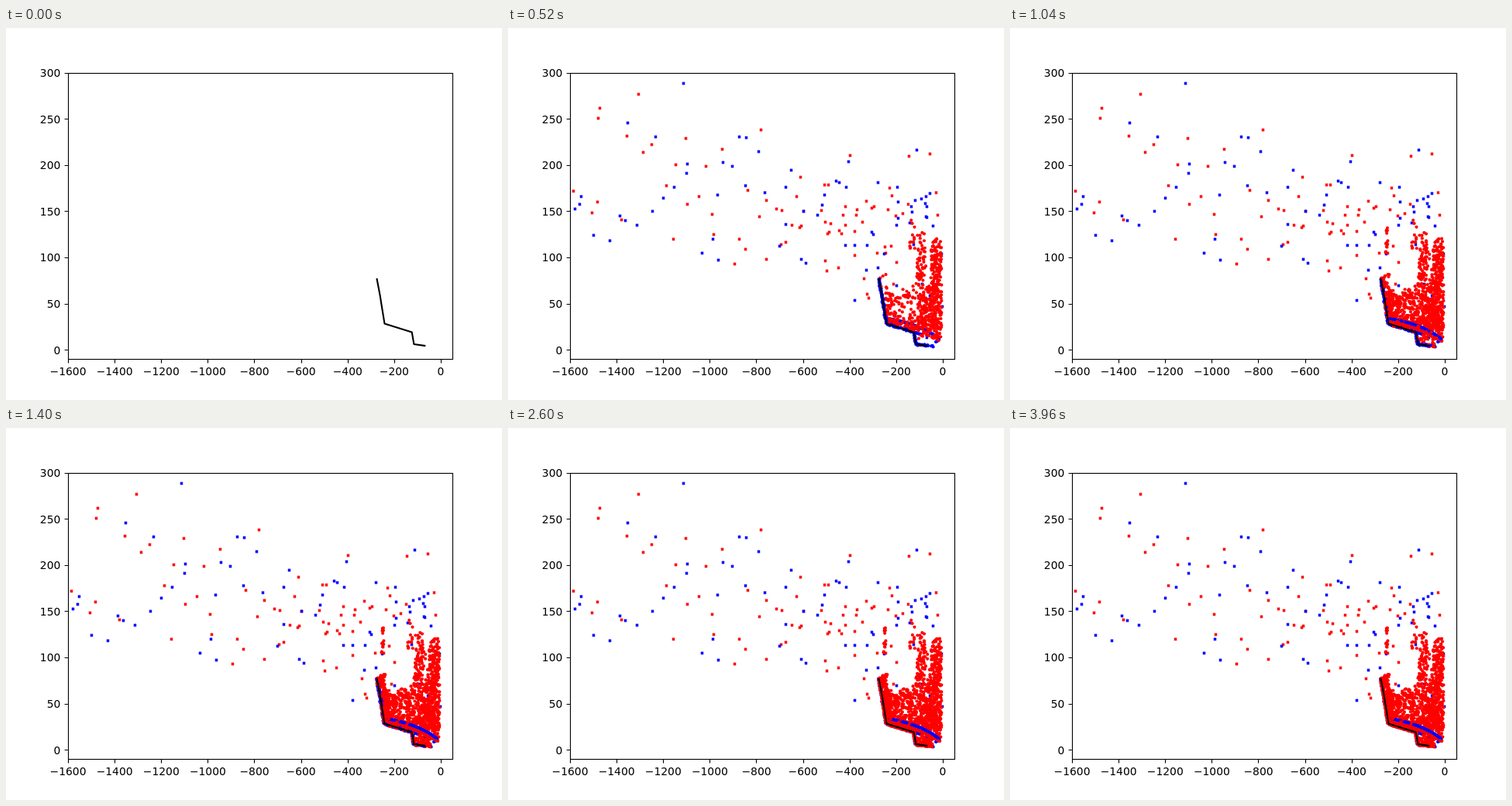
An HTML page with a canvas that plays this animation: 640x480 px, repeating every 4000 ms.

```html
<!DOCTYPE html>
<html lang="en">
<head>
<meta charset="utf-8">
<title>Scatter growth</title>
<style>
html, body { margin: 0; width: 100%; height: 100%; overflow: hidden; background: #fff; }
canvas { display: block; width: 640px; height: 480px; }
</style>
</head>
<body>
<canvas id="stage" width="640" height="480"></canvas>
<script>
const ctx = document.getElementById('stage').getContext('2d');
const LOOP = 4000, STEP = 40;
const RED = '#f00', BLUE = '#00f';

// Cross markers, as x, y pairs in pixels
const redFar = [
  84,210, 118,103, 116,116, 108,238, 115,224, 153,139, 168,85, 146,247,
  174,160, 185,150, 204,203, 216,176, 213,272, 229,142, 231,227, 246,217,
  255,178, 276,156, 263,240, 265,266, 292,304, 298,272, 306,285, 309,209,
  324,243, 326,131, 333,222, 333,298, 346,233, 353,235, 352,279, 358,276,
  366,254, 372,217, 377,192, 378,255, 376,257, 381,236
];
const redNear = [
  408,202, 413,202, 404,235, 409,250, 412,265, 414,263, 416,252, 409,300,
  411,313, 426,309, 427,261, 430,265, 432,241, 435,230, 435,254, 441,164,
  447,262, 447,293, 450,234, 449,241, 457,250, 459,323, 462,223, 463,343,
  465,348, 469,232, 472,230, 476,290, 480,322, 486,282, 487,290, 490,234,
  492,206, 495,216, 494,281, 497,330, 500,242, 501,302, 509,239, 517,165,
  516,227, 544,162, 552,212, 554,241
];
const blueFar = [
  226,71, 154,122, 190,140, 94,217, 92,227, 86,233, 110,267, 131,274,
  144,242, 151,248, 166,254, 186,236, 200,219, 214,205, 231,175, 230,187,
  270,215, 277,173, 289,178, 298,140, 307,141, 323,159, 306,203, 331,212,
  358,205, 365,183, 264,272, 250,290, 271,299, 350,281, 358,253, 381,236,
  378,298, 384,303, 399,241
];
const blueNear = [
  405,228, 408,215, 423,197, 427,199, 436,205, 439,172, 435,280, 447,280,
  447,351, 462,312, 463,280, 469,263, 471,266, 477,199, 477,309, 502,205,
  503,224, 503,245, 501,254, 485,291, 527,157, 525,222, 533,220, 520,230,
  521,237, 518,251, 538,226, 539,243, 540,244, 544,213, 539,217, 540,230,
  548,255, 523,279, 501,332, 533,380, 540,399, 560,359, 559,291, 556,319,
  544,345, 534,330
];
const track = [[478.6, 324], [482.8, 346], [484, 354], [488.5, 381.5], [523.7, 392.4], [526.4, 408], [540.3, 410]];
const longTrack = [...track, [547.5, 410.6]];
const skyline = [[486, 318], [491, 335], [500, 345], [511, 335], [520, 340], [527, 318],
  [533, 265], [540, 280], [545, 300], [551, 265], [560, 275]];

let seed = 20417;
function rnd() {
  seed = (seed * 1664525 + 1013904223) % 4294967296;
  return seed / 4294967296;
}
const between = (a, b) => a + (b - a) * rnd();

function lerpY(points, x) {
  for (let i = 1; i < points.length; i++) {
    const [x0, y0] = points[i - 1], [x1, y1] = points[i];
    if (x <= x1) return y0 + (y1 - y0) * (x - x0) / (x1 - x0);
  }
  return points[points.length - 1][1];
}

function along(points, u) {
  const lengths = points.slice(1).map((p, i) => Math.hypot(p[0] - points[i][0], p[1] - points[i][1]));
  let d = u * lengths.reduce((a, b) => a + b);
  let i = 0;
  while (i < lengths.length - 1 && d > lengths[i]) d -= lengths[i++];
  const f = d / lengths[i], a = points[i], b = points[i + 1];
  return [a[0] + (b[0] - a[0]) * f, a[1] + (b[1] - a[1]) * f];
}

// Bent blue path above the track
function arc(u) {
  const v = 1 - u;
  return [v * v * 491 + 2 * u * v * 534 + u * u * 556, v * v * 375 + 2 * u * v * 383 + u * u * 401];
}

const dots = [];
function add(count, from, to, color, place) {
  for (let i = 0; i < count; i++) {
    const [x, y] = place(i / Math.max(1, count - 1));
    dots.push({ x, y, color, born: Math.floor(between(from, to + 1)) });
  }
}
const box = (x0, x1, y0, y1, power = 1) => () =>
  [between(x0, x1), y1 - (y1 - y0) * Math.pow(rnd(), power)];
function jitter([x, y], r) {
  return [x + between(-r, r), y + between(-r, r)];
}
function mass() {
  const x = between(487, 558.5);
  const base = x < 524 ? lerpY(track, x) - 2 : Math.min(404, 388 + (x - 524) * 0.5);
  return [x, base - (base - lerpY(skyline, x)) * Math.pow(rnd(), 1.8)];
}
function leftBand() {
  const y = between(318, 381);
  const edge = 478.5 + Math.max(0, y - 324) * 0.175;
  return [edge + 1 + (y < 324 ? 3 : 0) + rnd() * 8, y];
}

// First burst
add(210, 1, 6, RED, box(546, 559.5, 272, 388, 1.15));
add(45, 1, 6, RED, box(528, 538, 264, 330));
add(65, 1, 6, RED, box(529, 541, 330, 385));
add(45, 1, 6, RED, box(538, 553, 332, 385));
add(14, 1, 6, RED, box(517.5, 525, 246, 288));
add(3, 1, 6, RED, box(510, 521, 345, 348));
add(90, 1, 5, BLUE, arc);
add(12, 1, 6, BLUE, u => [556 - 4 * u * u, 401 + 4 * u]);
add(110, 1, 6, BLUE, u => jitter(along(track, u), 0.7));
add(14, 1, 6, BLUE, u => [524 + 10 * u, 392.4 + 3.4 * u]);
// Filling up
add(640, 7, 20, RED, mass);
add(130, 21, 32, RED, mass);
add(55, 10, 20, RED, leftBand);
add(110, 21, 34, RED, leftBand);
add(5, 14, 20, RED, box(484.5, 487.5, 267, 291));
add(11, 21, 28, RED, box(484, 487, 256, 290));
add(22, 8, 20, RED, box(527, 548, 396, 409));
add(45, 21, 38, RED, box(527, 548, 400, 410));
add(70, 16, 20, BLUE, arc);
add(45, 24, 33, BLUE, arc);
add(160, 7, 20, BLUE, u => jitter(along(longTrack, u), 1.2));
add(60, 21, 36, BLUE, u => jitter(along(track, u), 1));
// The track turns red
add(170, 22, 50, RED, u => jitter(along(longTrack, u), 1.2));
add(230, 40, 78, RED, u => jitter(along(track, u), 1.1));
add(35, 79, 99, RED, u => jitter(along(track, u * 0.7), 1));
dots.sort((a, b) => a.born - b.born);

function crosses(list, color) {
  const r = 1.39;
  ctx.strokeStyle = color;
  ctx.lineWidth = 2.08;
  ctx.lineCap = 'butt';
  ctx.beginPath();
  for (let i = 0; i < list.length; i += 2) {
    const x = list[i] + 0.5, y = list[i + 1] + 0.5;
    ctx.moveTo(x - r, y - r);
    ctx.lineTo(x + r, y + r);
    ctx.moveTo(x - r, y + r);
    ctx.lineTo(x + r, y - r);
  }
  ctx.stroke();
}

function drawTrack() {
  ctx.strokeStyle = '#000';
  ctx.lineWidth = 2.08;
  ctx.lineCap = 'square';
  ctx.lineJoin = 'round';
  ctx.beginPath();
  track.forEach(([x, y]) => ctx.lineTo(x, y));
  ctx.stroke();
}

function drawAxes() {
  const snap = v => Math.floor(v + 0.5) + 0.5;
  const label = v => (v < 0 ? '\u2212' : '') + Math.abs(v);
  ctx.strokeStyle = ctx.fillStyle = '#000';
  ctx.lineWidth = 1.11;
  ctx.lineCap = 'butt';
  ctx.lineJoin = 'miter';
  ctx.font = '13.89px "DejaVu Sans", sans-serif';
  ctx.textBaseline = 'alphabetic';
  ctx.strokeRect(80.5, 58.5, 496, 369);
  ctx.beginPath();
  ctx.textAlign = 'center';
  for (let v = -1600; v <= 0; v += 200) {
    const x = 80 + (v + 1600) * 496 / 1650;
    ctx.moveTo(snap(x), 427.5);
    ctx.lineTo(snap(x), 432.4);
    ctx.fillText(label(v), x, 448);
  }
  ctx.textAlign = 'right';
  for (let v = 0; v <= 300; v += 50) {
    const y = 427.2 - (v + 10) * 369.6 / 310;
    ctx.moveTo(75.6, snap(y));
    ctx.lineTo(80.5, snap(y));
    ctx.fillText(label(v), 70.3, Math.round(y + 5.3));
  }
  ctx.stroke();
}

function draw(step) {
  ctx.fillStyle = '#fff';
  ctx.fillRect(0, 0, 640, 480);
  if (step > 0) {
    crosses(redFar, RED);
    crosses(redNear, RED);
    crosses(blueFar, BLUE);
    crosses(blueNear, BLUE);
    for (const d of dots) {
      if (d.born > step) break;
      ctx.fillStyle = d.color;
      ctx.beginPath();
      ctx.arc(d.x, d.y, 2.08, 0, 2 * Math.PI);
      ctx.fill();
    }
  }
  drawTrack();
  drawAxes();
}

let shown = -1;
const start = performance.now();
function tick() {
  const step = Math.floor(((performance.now() - start) % LOOP) / STEP);
  if (step !== shown) draw(shown = step);
  requestAnimationFrame(tick);
}
tick();
</script>
</body>
</html>
```
